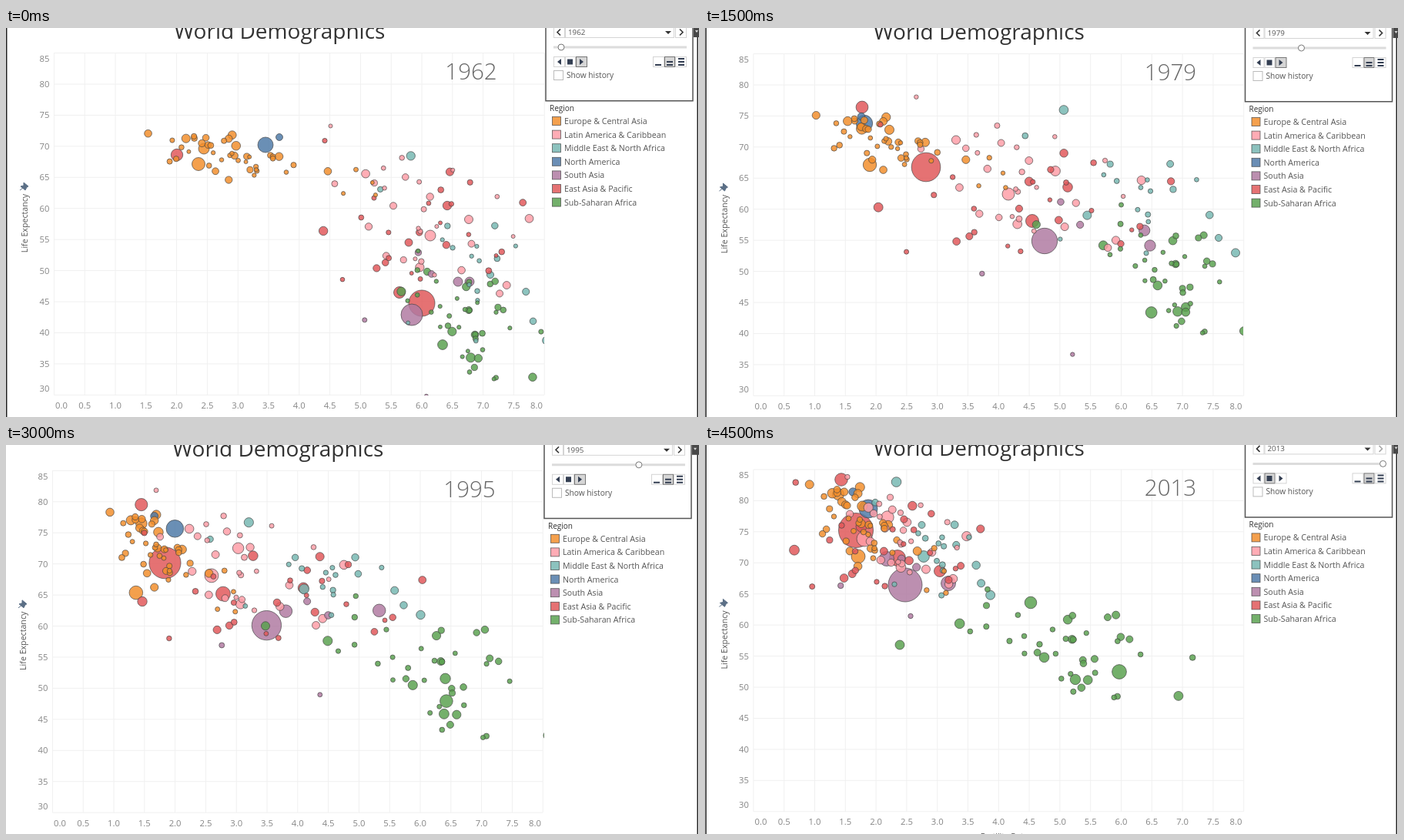
Recreate the animation shown at these times as an HTML page. Size 900 px wide and 506 px high, loop 5000 ms.

```html
<!DOCTYPE html>
<html lang="en">
<head>
<meta charset="utf-8">
<title>World Demographics</title>
<style>
  html, body { margin: 0; height: 100%; overflow: hidden; background: #fff; }
  svg { display: block; width: 100vw; height: 100vh; font-family: "Open Sans", "Noto Sans", sans-serif; }
  .grid { stroke: #f0f0f0; fill: none; }
  .tick { font-size: 11.3px; fill: #858585; text-anchor: middle; }
  .label { font-size: 10.65px; fill: #555; }
  .button { fill: #fff; stroke: #d4d4d4; }
  .pressed { fill: #d6d6d6; stroke: #777; }
  .icon { fill: #333e52; }
  .arrow { fill: none; stroke: #333; stroke-width: 1.6; }
  .bubble { fill-opacity: .84; stroke: #444; stroke-opacity: .85; stroke-width: .8; }
</style>
</head>
<body>
<svg viewBox="0 0 900 506" preserveAspectRatio="none">
  <defs><clipPath id="plot"><rect x="62" y="30" width="637" height="448"/></clipPath></defs>
  <path d="M898.2 0V506" stroke="#222" stroke-width="1.5"/>
  <g id="sheet">
    <path d="M.7 -5V520" stroke="#222" stroke-width="1.5"/>
    <g id="axes"></g>
    <text x="355.3" y="14.3" font-size="28" fill="#333" text-anchor="middle">World Demographics</text>
    <text id="bigYear" x="604" y="67" font-size="29.5" font-weight="300" fill="#666" text-anchor="middle"></text>
    <text class="label" transform="translate(28 254) rotate(-90)" text-anchor="middle">Life Expectancy</text>
    <text class="label" x="388" y="513.6" text-anchor="middle">Fertility Rate</text>
    <path d="M23 201l6 5-2 1-2 4-6-5 4-1zM22 208l-4 3" fill="#5b6f86" stroke="#5b6f86"/>
  </g>
  <g id="bubbles" clip-path="url(#plot)"></g>
  <g id="panel">
    <path d="M701 -5V94.7H892V-5" fill="#fff" stroke="#555" stroke-width="1.5"/>
    <rect x="893" y="-5" width="10" height="17" fill="#484848"/>
    <path d="M895 3h4l-2 3z" fill="#ddd"/>
    <rect class="button" x="711.5" y="-4.5" width="14" height="17"/>
    <rect class="button" x="726.5" y="-4.5" width="141" height="17"/>
    <rect class="button" x="869.5" y="-4.5" width="14" height="17"/>
    <path class="arrow" d="M720 1.5l-4 4 4 4"/>
    <path class="arrow" id="next" d="M875 1.5l4 4-4 4"/>
    <path d="M856 4h8l-4 4z" fill="#333"/>
    <text class="label" id="smallYear" x="730" y="9" style="font-size:9.8px"></text>
    <path d="M711 25H884" stroke="#dcdcdc" stroke-width="3"/>
    <circle id="knob" cy="25" r="4" fill="#fff" stroke="#777"/>
    <rect class="button" x="711.5" y="37.5" width="14" height="13"/>
    <rect id="stop" x="726.5" y="37.5" width="13" height="13"/>
    <rect id="play" x="740.5" y="37.5" width="14" height="13"/>
    <path class="icon" d="M721 40v8l-5-4zM729 40.5h7v7h-7zM745 40v8l5-4z"/>
    <rect class="button" x="840.5" y="37.5" width="14" height="13"/>
    <rect class="pressed" x="855.5" y="37.5" width="13" height="13"/>
    <rect class="button" x="869.5" y="37.5" width="14" height="13"/>
    <path class="icon" d="M843 47h8v2h-8zM858 43h8v2h-8zM858 47h8v2h-8zM873 39h8v2h-8zM873 43h8v2h-8zM873 47h8v2h-8z"/>
    <rect class="button" x="711.5" y="55.5" width="12" height="12" style="stroke:#bbb"/>
    <text class="label" x="728" y="65" style="font-size:10.2px">Show history</text>
    <text class="label" x="706" y="108" style="font-size:10px;fill:#333">Region</text>
    <g id="legend"></g>
  </g>
</svg>
<script>
const $ = id => document.getElementById(id);
const add = (parent, tag, attrs, text = '') => {
  const el = document.createElementNS('http://www.w3.org/2000/svg', tag);
  for (const key in attrs) el.setAttribute(key, attrs[key]);
  el.textContent = text;
  return parent.appendChild(el);
};

const EUROPE = '#f28e2b', LATIN = '#ff9da7', MIDEAST = '#76b7b2', NORTH = '#4e79a7',
  SOUTH = '#b07aa1', EAST = '#e15759', AFRICA = '#59a14f';
const legend = [[EUROPE, 'Europe & Central Asia'], [LATIN, 'Latin America & Caribbean'],
  [MIDEAST, 'Middle East & North Africa'], [NORTH, 'North America'], [SOUTH, 'South Asia'],
  [EAST, 'East Asia & Pacific'], [AFRICA, 'Sub-Saharan Africa']];

// Years shown, one per half second, and the small camera shake that goes with them.
const years = [1962, 1967, 1973, 1979, 1984, 1989, 1995, 2000, 2006, 2013];
const shakeX = [0, 0, -1.5, .5, -1, .5, -2, .7, .7, .5];
const shakeY = [0, 0, -.5, 1, .5, 1, .8, .3, .3, -.6];

// Value on a path of evenly spaced key points, t running from 0 to 1.
function along(path, t) {
  const i = Math.min(Math.floor(t * (path.length - 1)), path.length - 2);
  const k = t * (path.length - 1) - i;
  return path[i].map((a, n) => a + (path[i + 1][n] - a) * k);
}

let seed = 11;
const random = () => (seed = seed * 16807 % 2147483647) / 2147483647;
const spread = () => (random() + random() - 1) * 2.4;

const bubbles = [];
function country(fill, r0, r1, ...path) {
  bubbles.push({ fill, size: r0 + r1, place: t => [...along(path, t), r0 + (r1 - r0) * t] });
}
// Smaller countries scattered about a moving centre; path points are x, y, width, height.
function cloud(fill, count, tail, ...path) {
  for (let n = 0; n < count; n++) {
    const u = spread() + tail * random() ** 5;
    const v = .4 * u + .8 * spread();
    const r = 2.5 + 3.6 * random() ** 2;
    bubbles.push({ fill, size: 2 * r, place: t => {
      const [x, y, width, height] = along(path, t);
      return [x + u * width, Math.max(40, y + v * height), r + .7 * t];
    } });
  }
}

country(EAST, 17, 22.5, [540, 358], [455, 215], [287, 181], [270, 163], [198, 152], [187, 127], [196, 111]);
country(EAST, 7.5, 10.5, [511, 344], [425, 251], [273, 190], [250, 147]);
country(EAST, 7.7, 8.3, [222, 165], [204, 103], [174, 76], [177, 45]);
country(EAST, 5.7, 7.5, [573, 231], [420, 195], [305, 164]);
country(EAST, 5, 7, [523, 279], [370, 160], [203, 106]);
country(SOUTH, 14, 22, [527, 373], [441, 277], [332, 232], [260, 182]);
country(SOUTH, 6, 9.5, [602, 330], [555, 230], [316, 180]);
country(SOUTH, 6, 9.5, [587, 330], [578, 283], [350, 212], [236, 148]);
country(NORTH, 10, 12, [337, 152], [220, 145], [207, 124], [222, 115], [219, 108], [226, 94], [212, 83]);
country(NORTH, 4.5, 5.2, [355, 142], [203, 115], [192, 91], [192, 61]);
country(EUROPE, 8.5, 9, [250, 177], [214, 178], [166, 193], [199, 145]);
country(EUROPE, 7, 7.5, [257, 157], [177, 118], [173, 64]);
country(LATIN, 7, 10, [551, 270], [394, 216], [259, 167], [207, 122]);
country(LATIN, 5.5, 8.2, [601, 249], [455, 186], [292, 131], [237, 94]);
country(MIDEAST, 4.6, 7.4, [629, 321], [430, 205], [284, 145]);
country(AFRICA, 6.4, 9.4, [567, 412], [586, 349], [538, 295]);
country(AFRICA, 4.8, 7.8, [609, 399], [632, 345], [423, 205]);
country(AFRICA, 4.7, 6, [547, 317], [372, 225], [253, 260]);

cloud(EUROPE, 45, 8, [255, 158, 30, 17], [203, 138, 25, 20], [172, 120, 16, 28], [178, 88, 18, 30]);
cloud(LATIN, 30, 0, [550, 250, 75, 50], [420, 200, 85, 45], [310, 155, 70, 40], [262, 120, 45, 32]);
cloud(MIDEAST, 19, 0, [600, 300, 75, 62], [560, 210, 95, 48], [400, 165, 95, 30], [300, 130, 52, 38]);
cloud(EAST, 24, 0, [545, 255, 75, 60], [420, 225, 110, 55], [360, 195, 105, 45], [240, 130, 70, 45]);
cloud(SOUTH, 4, 0, [575, 385, 75, 80], [520, 325, 110, 85], [450, 260, 120, 50], [300, 185, 85, 32]);
cloud(AFRICA, 40, 0, [600, 385, 42, 45], [610, 325, 45, 45], [560, 300, 72, 50], [475, 268, 70, 38]);

// Larger bubbles lie behind smaller ones.
bubbles.sort((a, b) => b.size - a.size);
for (const b of bubbles) b.el = add($('bubbles'), 'circle', { class: 'bubble', fill: b.fill });

// The outermost labels are pulled inside the plot.
for (let i = 0; i <= 16; i++) {
  const x = 62.4 + i * 39.8;
  add($('axes'), 'path', { class: 'grid', d: `M${x} 32.5V477.4` });
  add($('axes'), 'text', { class: 'tick', x: Math.min(689, Math.max(72, x)), y: 495 }, (i / 2).toFixed(1));
}
for (let age = 30; age <= 85; age += 5) {
  const y = 73 + (80 - age) * 8.087;
  add($('axes'), 'path', { class: 'grid', d: `M62.4 ${y}H699` });
  add($('axes'), 'text', { class: 'tick', x: 50, y: Math.min(469, Math.max(40, y)) + 4 }, age);
}
legend.forEach(([fill, name], i) => {
  const y = 121 + i * 17.6;
  add($('legend'), 'rect', { class: 'bubble', x: 709.5, y: y - 5.5, width: 11, height: 11, fill });
  add($('legend'), 'text', { class: 'label', x: 725, y: y + 4 }, name);
});

function show(step) {
  const year = years[step], t = (year - 1962) / 51, ended = t === 1;
  const shift = `translate(${shakeX[step]} ${shakeY[step]})`;
  $('sheet').setAttribute('transform', shift);
  $('panel').setAttribute('transform', shift);
  $('bigYear').textContent = $('smallYear').textContent = year;
  $('knob').setAttribute('cx', 721 + 159 * t);
  $('stop').setAttribute('class', ended ? 'pressed' : 'button');
  $('play').setAttribute('class', ended ? 'button' : 'pressed');
  $('next').style.stroke = ended ? '#aaa' : '';
  for (const b of bubbles) {
    const [cx, cy, r] = b.place(t);
    b.el.setAttribute('cx', cx);
    b.el.setAttribute('cy', cy);
    b.el.setAttribute('r', r);
  }
}

let shown = -1;
function tick() {
  const step = Math.floor(performance.now() % 5000 / 500);
  if (step !== shown) show(shown = step);
  requestAnimationFrame(tick);
}
tick();
</script>
</body>
</html>
```
